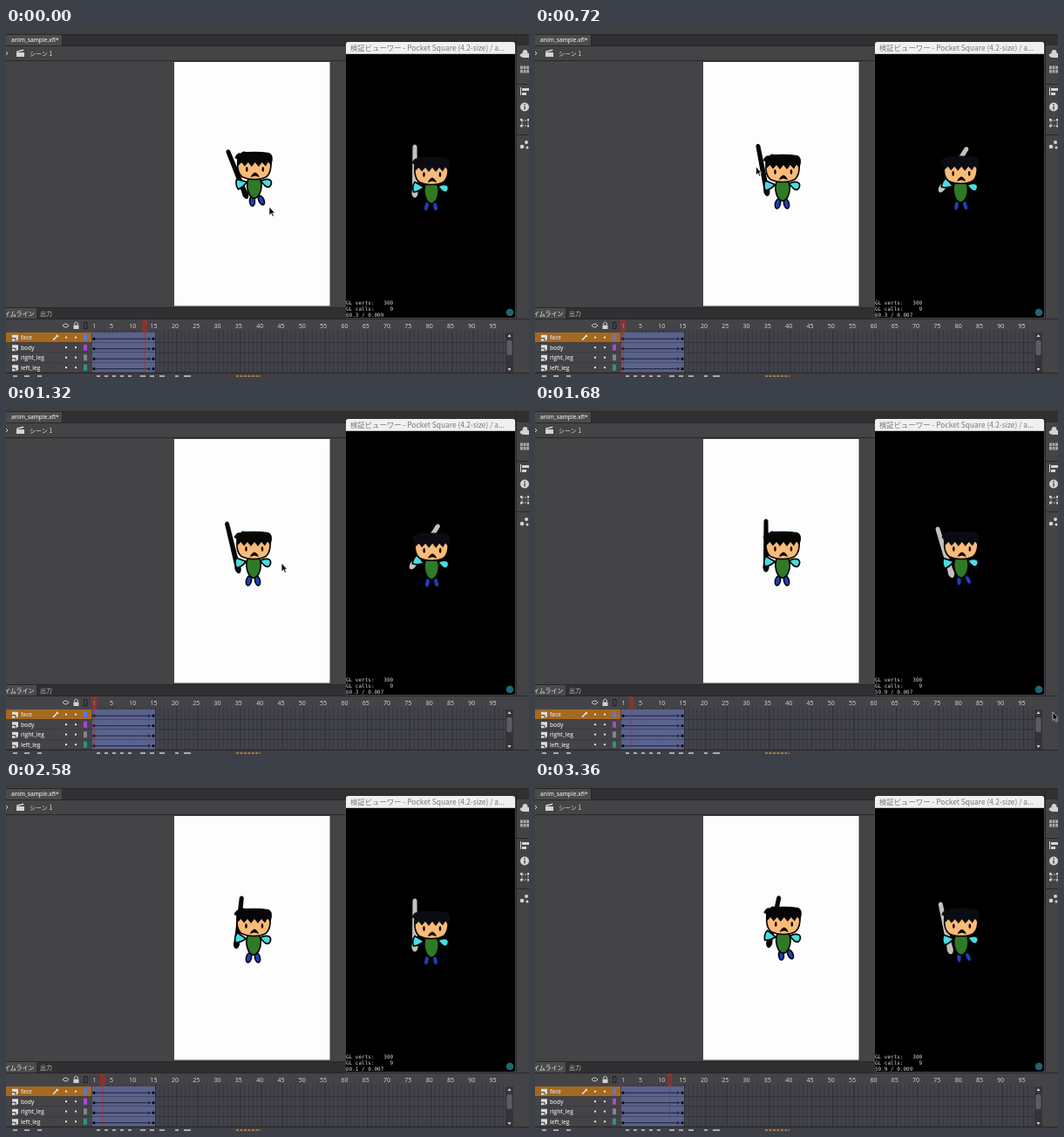
Recreate the animation shown at these times as an HTML page. Size 600 px wide and 400 px high, loop 3.42 s.

```html
<!DOCTYPE html>
<html lang="ja">
<head>
<meta charset="utf-8">
<title>Sprite preview</title>
<style>
  html, body { margin: 0; width: 100%; height: 100%; overflow: hidden; background: #444446; }
  svg { display: block; width: 600px; height: 400px; }
  text { font-family: "Noto Sans CJK JP", "Noto Sans CJK", "Open Sans", sans-serif; font-size: 7px; fill: #dcdcdc; }
  .tab { font-family: "Open Sans", sans-serif; font-size: 6.5px; font-weight: 600; }
  .mid { text-anchor: middle; font-family: "Open Sans", sans-serif; }
  .stat { font: 6px "DejaVu Sans Mono", monospace; fill: #d8d8d8; white-space: pre; }
  .ink { stroke: #060606; stroke-width: 1.7; stroke-linejoin: round; }
</style>
</head>
<body>
<svg viewBox="0 0 600 400">
  <rect width="600" height="400" fill="#444446"/>
  <!-- document tabs -->
  <rect width="600" height="7" fill="#3f3f41"/>
  <rect y="7" width="600" height="13" fill="#303032"/>
  <rect y="8" width="64" height="12" fill="#4b4b4d"/>
  <path d="M0 7.5H600M0 20.5H390M64.5 8V20M0 37.5H390" stroke="#272729" fill="none"/>
  <text class="tab" x="6" y="16">anim_sample.xfl*</text>
  <path d="M-1 26l3 3l-3 3" stroke="#ccc" fill="none"/>
  <path d="M12 28h9v5h-9zM12 26.500l8-2l.5 1.500l-8 2z" fill="#d4d4d4"/>
  <text x="27" y="31.500">シーン 1</text>
  <rect x="193" y="39" width="178.500" height="279.500" fill="#fdfdfd"/>

  <!-- right tool strip -->
  <path d="M585.500 8V333M585 64.500H600M585 122.500H600" stroke="#272729" fill="none"/>
  <g fill="#d4d4d4">
    <path d="M589.500 31q1-2 3-2q0-4 3-4q3 0 3 4h2v5h-6q-4 0-5-3z"/>
    <path d="M590 43.500h10v8h-10z" opacity=".7"/>
    <path d="M590 68h1v9h-1zM592 69h8v3h-8zM592 74h5v3h-5z"/>
    <circle cx="595" cy="90.500" r="5"/>
    <path d="M590 104h2.500v2.500h-2.500zM598 104h2v2.500h-2zM590 111h2.500v2.500h-2.500zM598 111h2v2.500h-2z"/>
    <path d="M592 106h7v6h-7z" fill="none" stroke="#bbb" stroke-dasharray="2 1"/>
    <circle cx="592" cy="136" r="2.300"/><circle cx="597" cy="131" r="2"/><circle cx="598" cy="137" r="1.500"/>
  </g>
  <path d="M590 47.500h10M593.300 43.500v8M596.700 43.500v8" stroke="#444446" stroke-width=".8"/>
  <path d="M594.400 89.500h1.300v4h-1.300zM594.400 87h1.300v1.400h-1.300z" fill="#333"/>

  <!-- device window -->
  <rect x="390" y="16" width="194" height="316" rx="2.500" fill="#000"/>
  <path d="M390 30V18.500q0-2.500 2.500-2.500H581.500q2.500 0 2.500 2.500V30z" fill="#f0f0f0"/>
  <path d="M390 29.500H584" stroke="#bcbcbc"/>
  <text x="395" y="26" style="font-size:8.400px;fill:#787878">検証ビューワー - Pocket Square (4.2-size) / a...</text>
  <text class="stat" x="390" y="316.500" xml:space="preserve">GL verts:   300</text>
  <text class="stat" x="390" y="323.500" xml:space="preserve">GL calls:     9</text>
  <text class="stat" id="fps" x="390" y="330.500"></text>
  <circle cx="578" cy="326" r="4.300" fill="#1f6478"/>

  <!-- timeline -->
  <rect y="320" width="390" height="13" fill="#303032"/>
  <path d="M0 321h35v12h-35z" fill="#4b4b4d"/>
  <path d="M0 320.500H390M0 333.500H600" stroke="#272729"/>
  <text x="-9" y="329.500" style="fill:#f0f0f0">タイムライン</text>
  <text x="39" y="329.500" style="fill:#bcbcbc">出力</text>
  <g id="grid"></g>
  <path d="M65 341q3.500-4 7 0q-3.500 4-7 0z" fill="none" stroke="#d4d4d4"/>
  <path d="M77.500 340.500h6v4.500h-6z" fill="#d4d4d4"/>
  <path d="M78.500 340v-1.500q2-3 4 0v1.500" fill="none" stroke="#d4d4d4"/>
  <path d="M89.500 337.500h3.500v7h-3.500z" fill="none" stroke="#1e1e20"/>
  <g id="layers"></g>
  <rect x="573" y="349" width="9" height="46" fill="#343438"/>
  <rect x="574.500" y="358" width="6" height="17" rx="2" fill="#5c5c66"/>
  <path d="M575.500 354l2-3l2 3zM575.500 390l2 3l2-3z" fill="#d4d4d4"/>
  <rect y="395" width="600" height="5" fill="#404044"/>
  <path d="M0 395.500H600" stroke="#272729"/>
  <path d="M8 399h5M21 399h6M36 399h5M104 399h4M113 399h4M122 399h4M131 399h4M140 399h4M154 399h6M165 399h5M176 399h6M194 399h4M204 399h8" stroke="#aaa" stroke-width="2"/>
  <path d="M264 399h28" stroke="#a87840" stroke-width="2" stroke-dasharray="3 1.500"/>
  <g id="head">
    <rect x="-2.300" y="335" width="4.600" height="13" fill="#b02c24" fill-opacity=".5" stroke="#b02c24" stroke-width=".8"/>
    <path d="M0 348V395" stroke="#b02c24" stroke-width=".8"/>
  </g>

  <g id="stage"></g>
  <g id="device" transform="translate(204 3)"></g>
  <path id="cursor" d="M0 0V9.500L2.200 7.600L3.800 11L5.300 10.300L3.700 7H6.400z" fill="#060606" stroke="#fff" stroke-width=".6"/>
</svg>
<script>
const LOOP = 3420, STEP = 60, CYCLE = 15;
const $ = id => document.getElementById(id);
const frameX = n => 101 + (n - 1) * 4.863;

// Timeline ruler and cells
let grid = '<rect y="334" width="600" height="15" fill="#444448"/>' +
  '<rect x="98" y="349" width="475" height="46" fill="#42424a"/>';
for (let n = 1; n <= 97; n++) {
  const x = frameX(n) + 2.4, major = n % 5 === 0;
  grid += `<path d="M${x} 346V395" stroke="#303038" stroke-width="${major ? 1.2 : .6}"/>`;
  if (n === 1 || major) grid += `<text class="mid" x="${frameX(n) + .5}" y="344">${n}</text>`;
}
$('grid').innerHTML = grid;

const LAYERS = [['face', '#5a78e0'], ['body', '#a846d8'], ['right_leg', '#84848c'], ['left_leg', '#2c9484']];
$('layers').innerHTML = LAYERS.map(([name, tint], i) => {
  const y = 349 + i * 11.5, c = y + 5.7;
  return `<rect y="${y}" width="98" height="11.5" fill="${i ? '#444448' : '#a5681f'}"/>
    <rect x="99" y="${y}" width="72" height="11.2" fill="#5a638e"/>
    <path d="M0 ${y + 11.5}H573" stroke="#2a2a30" stroke-width=".7"/>
    <path d="M7 ${c - 3}h7v5l-2 2h-5z" fill="#dcdcdc"/><path d="M7 ${c + 1}h4v3" stroke="#333" fill="none"/>
    <text class="tab" x="17" y="${c + 2.3}">${name}</text>
    ${i ? '' : `<path d="M54 ${c + 3}l5-5M58 ${c - 3}l2 2" stroke="#f0f0f0" stroke-width="1.300"/>`}
    <circle cx="69" cy="${c}" r="1.1" fill="#f0f0f0"/><circle cx="80" cy="${c}" r="1.1" fill="#f0f0f0"/>
    <rect x="89" y="${c - 3.5}" width="4" height="7" fill="${tint}"/>
    <path d="M103 ${c + 1.5}H165M163 ${c}l2.500 1.500l-2.500 1.500" stroke="#10101c" stroke-width=".8" fill="none"/>
    <circle cx="101" cy="${c + 1.5}" r="1.6" fill="#08080c"/><circle cx="169" cy="${c + 1.5}" r="1.6" fill="#08080c"/>`;
}).join('');

// One puppet per window; returns a function that sets its pose
function makePuppet(root, blade, hair) {
  const leg = '<ellipse class="ink" rx="2.900" ry="5.500" fill="#1c40c4"/>';
  root.innerHTML = `
    <path class="sword" fill="${blade}" d="M-2.500 -57Q0 -61 2.500 -57L3 -9L3.600 -3Q2.500 2 0 2Q-2.500 2 -3.600 -3L-3 -9z"/>
    <g class="legL">${leg}</g><g class="legR">${leg}</g>
    <g class="top">
      <path class="ink" fill="#48dce0" d="M291.500 178.500Q298 175 302.500 177.500Q305 180.500 302 184.500Q299.500 186.500 296 183.500z"/>
      <path class="ink" fill="#2f7a26" d="M277 176.500Q284 174 291 176.500Q294 185 290 193.500Q284 202.500 278.500 194Q274 185 277 176.500z"/>
      <g class="arm"><path class="ink" fill="#48dce0" d="M275.500 179.500L265 173.500Q261.500 178 263.500 185Q269 185 275.500 179.500z"/></g>
      <path class="ink" fill="#fabb78" d="M265 156Q264 169 270 173.500Q276 176.500 284 176.500Q293 176.500 298 173.500Q304 169 303 156z"/>
      <path fill="${hair}" d="M261.500 152Q264 145.500 269 146.500Q270 143.500 275 145Q290 144 301 146Q305.500 148 305 154L303.500 161L300 156.500L297 161.500L293 157L289 162L285 157L281 162L277 157L273 161.500L269.500 157L265.500 161Q264.500 157 264 153z"/>
      <ellipse cx="275.500" cy="165" rx="1.300" ry="2.900" fill="#060606"/>
      <ellipse cx="294" cy="165" rx="1.300" ry="2.900" fill="#060606"/>
      <path d="M285 168.500Q288.500 169.500 290 174L285 172.500L279.800 174Q281.500 169.500 285 168.500z" fill="#060606"/>
    </g>`;
  const set = (name, value) => root.querySelector('.' + name).setAttribute('transform', value);
  return ([angle, x, y, bob, lean]) => {
    set('sword', `translate(${x} ${y}) rotate(${angle})`);
    set('legL', `translate(${278.5 + lean * 4} ${201.5 - lean * 3}) rotate(${13 - lean * 17})`);
    set('legR', `translate(${288.5 + lean * 4.5} ${201.5 - lean * 4}) rotate(${-13 - lean * 12})`);
    set('top', `translate(${lean * .8} ${bob})`);
    set('arm', `rotate(${angle * .7} 275 179)`);
  };
}

// Linear interpolation over rows of [position, ...values]
function sample(rows, at) {
  let i = 0;
  while (i < rows.length - 2 && at >= rows[i + 1][0]) i++;
  const [a, b] = [rows[i], rows[i + 1]];
  const k = Math.min(1, Math.max(0, (at - a[0]) / (b[0] - a[0])));
  return a.slice(1).map((v, j) => v + (b[j + 1] - v) * k);
}

// Timeline position: sword angle, grip x, grip y, bob, leg lean
const POSES = [
  [1, -14, 267, 191, 0, 0], [3, 0, 265, 189.5, 0, 0], [4, 7, 264, 189, 0, 0],
  [6.5, 26, 261.5, 185, -1, .2], [8, 40, 260, 182, -1, .2], [10.2, 24, 262, 185, -1.5, .3],
  [12.1, 12, 268, 188, -2, 1], [12.6, -2, 270, 191, -2.5, 1],
  [13.2, -17, 274.5, 193, -3, 1], [13.6, -22, 276, 194, -3, 1],
  [15, -14, 267, 191, 0, 0], [16, -14, 267, 191, 0, 0]
];
// Time: stage and device position, about three timeline frames per step
const CLOCK = [
  [0, 13.6, 3], [420, 31, 25.2], [1020, 61.9, 53], [1680, 93, 88.2],
  [2220, 120, 117.6], [2580, 138.9, 138], [3360, 177.1, 178]
];
const POINTER = [
  [0, 302, 205], [480, 302, 205], [960, 205, 113], [1200, 205, 113],
  [1620, 594, 352], [1680, 594, 352], [1860, 612, 360]
];
const FPS = [
  [0, '60.3 / 0.009'], [720, '60.3 / 0.007'], [1380, '59.9 / 0.007'],
  [1980, '59.8 / 0.009'], [2400, '60.1 / 0.007'], [3000, '59.9 / 0.009']
];

const poseStage = makePuppet($('stage'), '#060606', '#060606');
const poseDevice = makePuppet($('device'), '#c4c0c0', '#0b0b14');
const wrap = p => (p - 1) % CYCLE + 1;

function draw(now) {
  const t = Math.floor(now % LOOP / STEP) * STEP;
  const [stage, device] = sample(CLOCK, t).map(p => wrap(p + 1e-6));
  poseStage(sample(POSES, stage));
  poseDevice(sample(POSES, device));
  $('head').setAttribute('transform', `translate(${frameX(Math.floor(stage))} 0)`);
  $('cursor').setAttribute('transform', `translate(${sample(POINTER, t)})`);
  $('fps').textContent = FPS.filter(row => row[0] <= t).pop()[1];
}

const start = performance.now();
function tick() {
  draw(performance.now() - start);
  requestAnimationFrame(tick);
}
tick();
</script>
</body>
</html>
```
